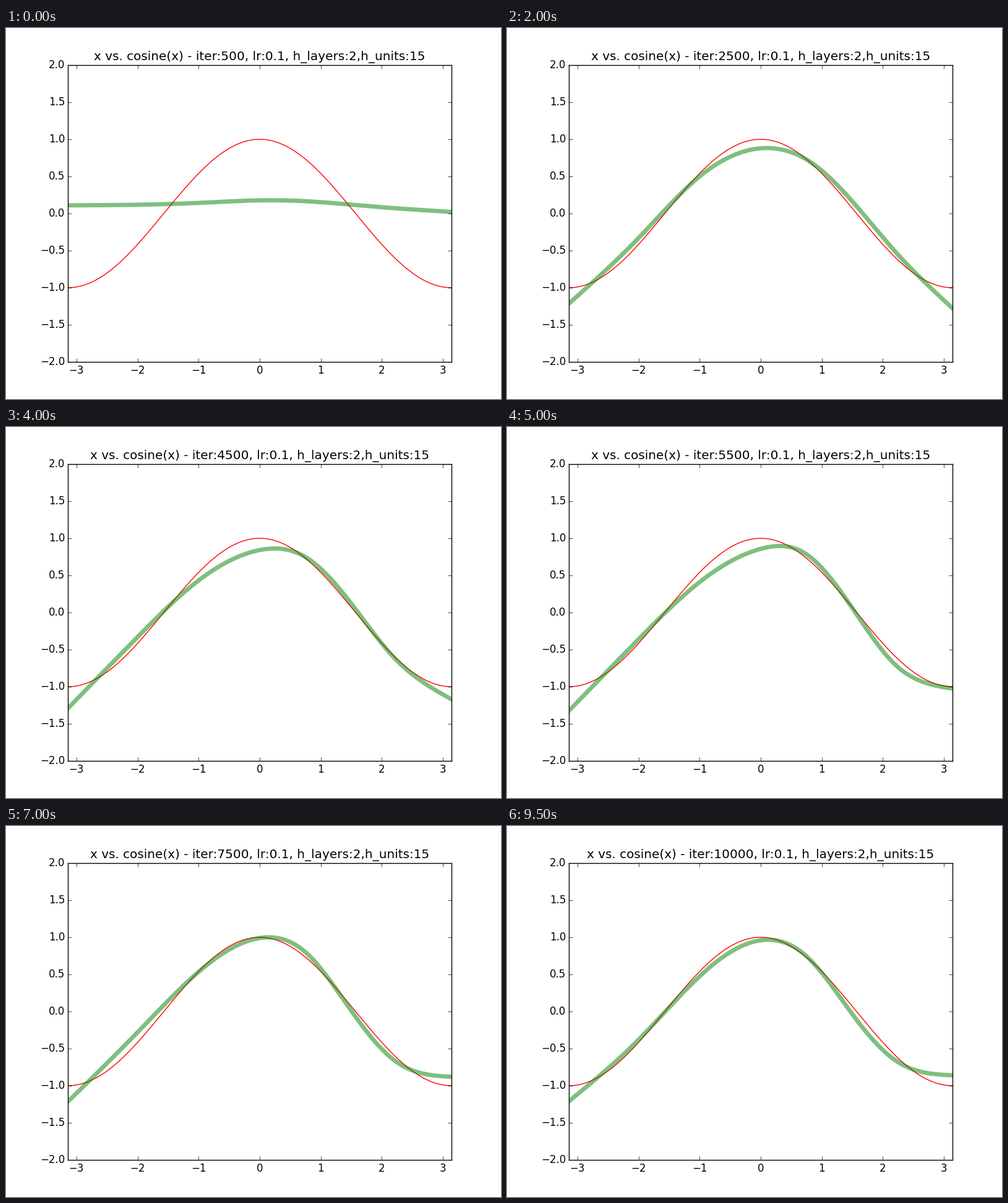
These frames come from a looping animation (800 by 600 pixels, 10 s). A matplotlib script:

```python
import matplotlib.pyplot as plt
import numpy as np
from matplotlib.animation import FuncAnimation

plt.style.use("classic")
plt.rcParams.update({"font.family": "DejaVu Sans", "figure.dpi": 100,
                     "figure.facecolor": "white",
                     "xtick.major.pad": 3.3, "ytick.major.pad": 3.3})

FRAMES = 20
INTERVAL = 500
ITERS_PER_FRAME = 500
OVERSHOOT = .06

# A few points of the network's output at the main training stages, by step.
KNOTS = np.array([-np.pi, -2, -1, 0, .75, 1.5, 2.2, np.pi])
STAGES = {
    0: [.11, .118, .143, .177, .166, .119, .072, .021],
    2: [-1.17, -.36, .545, .932, .745, .15, -.505, -1.24],
    6: [-1.26, -.30, .455, .825, .71, .18, -.515, -1.315],
    10: [-1.325, -.36, .41, .858, .785, .06, -.70, -1.025],
    14: [-1.215, -.28, .535, .99, .80, .01, -.655, -.88],
    16: [-1.135, -.23, .60, 1.06, .855, .055, -.605, -.82],
    19: [-1.21, -.38, .475, .96, .745, -.035, -.655, -.86],
}


def spline(values, x):
    """Natural cubic spline through KNOTS, as a sum of |x - knot|^3 terms."""
    def terms(points):
        cubes = np.abs(points[:, None] - KNOTS) ** 3
        return np.column_stack([cubes, np.ones_like(points), points])

    ends = np.vstack([np.ones_like(KNOTS), KNOTS])
    system = np.vstack([terms(KNOTS), np.hstack([ends, np.zeros((2, 2))])])
    return terms(x) @ np.linalg.solve(system, np.append(values, [0, 0]))


x = np.linspace(-np.pi, np.pi, 400)
steps = np.array(list(STAGES))
curves = [spline(values, x) for values in STAGES.values()]


def prediction(step):
    i = min(np.searchsorted(steps, step, side="right") - 1, len(steps) - 2)
    w = (step - steps[i]) / (steps[i + 1] - steps[i])
    if i == 0:  # learning is fastest at the start
        w = 1 - (1 - w) ** 3
    # Late in training the bias overshoots on every other step.
    bias = -OVERSHOOT if step % 2 and steps[3] < step < steps[-1] else 0
    return (1 - w) * curves[i] + w * curves[i + 1] + bias


fig, ax = plt.subplots(figsize=(8, 6), dpi=100)
ax.set_position([.125, .1, .775, .8])
ax.set_xlim(-np.pi, np.pi)
ax.set_ylim(-2, 2)
ax.set_xticks(range(-3, 4))
ax.set_yticks(np.arange(-2, 2.1, .5))
ax.plot(x, np.cos(x), color="red", lw=1)
fit, = ax.plot(x, curves[0], color="green", lw=5, alpha=.5)
title = ax.set_title("", pad=5.7)


def draw(step):
    fit.set_ydata(prediction(step))
    title.set_text(f"x vs. cosine(x) - iter:{ITERS_PER_FRAME * (step + 1)}, "
                   "lr:0.1, h_layers:2,h_units:15")
    return fit, title


anim = FuncAnimation(fig, draw, frames=FRAMES, interval=INTERVAL,
                     repeat=True, repeat_delay=0)
plt.show()
```
